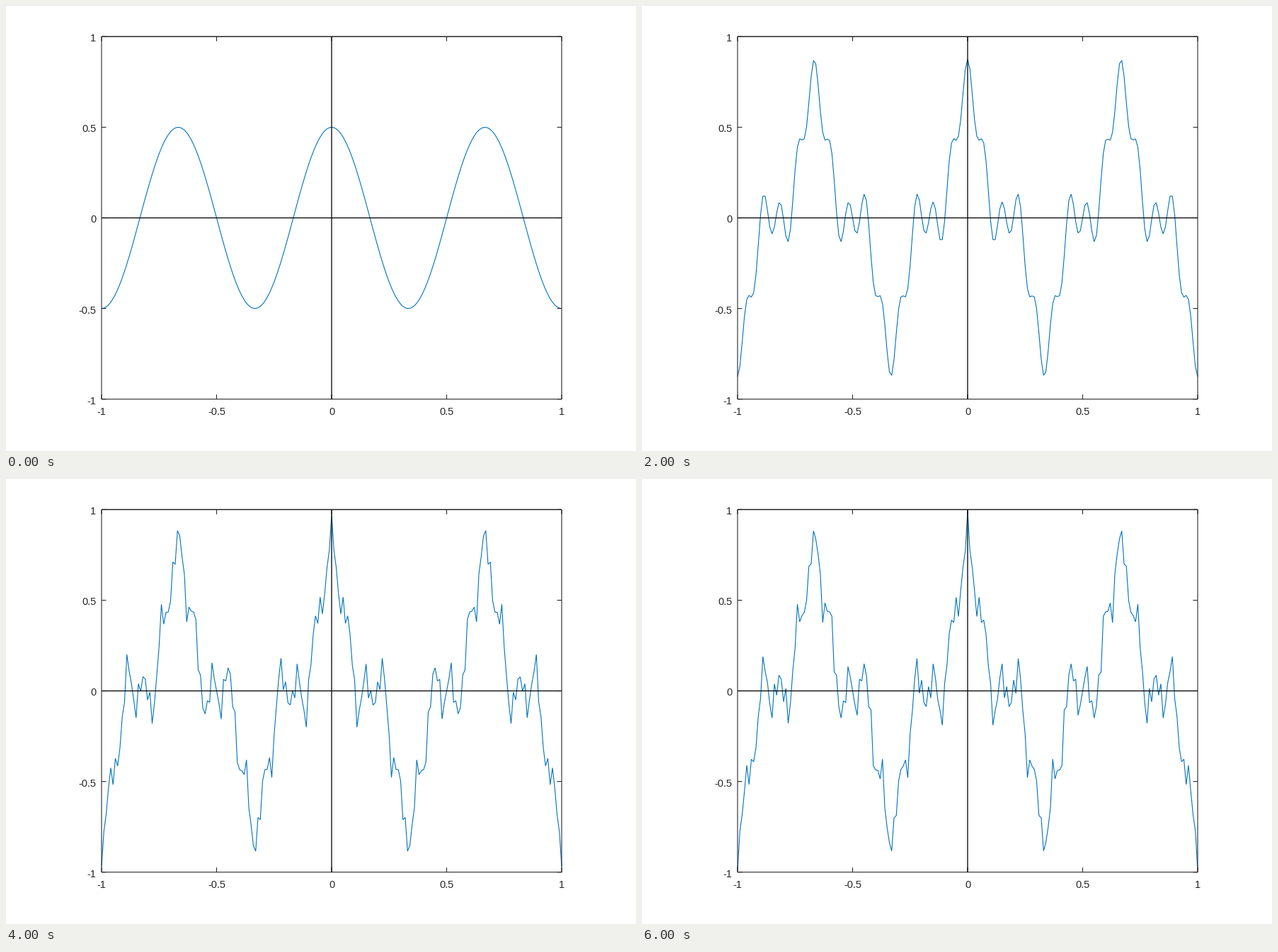
Animation of 890x629 px, one loop 7 s. Source, as a matplotlib script:

```python
import numpy as np
import matplotlib.pyplot as plt
from matplotlib.animation import FuncAnimation

W, H, DPI = 890, 629, 64
PX = 72 / DPI                      # points per pixel
CX, CY = 460, 299.5                # plot centre in pixels
RX, RY = 325, 256.2                # pixels per data unit
TICK = 6.5
INK = "#262626"
TERMS = 7

plt.rcParams["font.family"] = "Liberation Sans"
plt.rcParams["path.simplify"] = False

fig = plt.figure(figsize=(W / DPI, H / DPI), dpi=DPI, facecolor="white")
ax = fig.add_axes([0, 0, 1, 1])
ax.set(xlim=(0, W), ylim=(H, 0))
ax.axis("off")


def to_px(x, y):
    return CX + RX * x, CY - RY * y


def stroke(xs, ys, color, width, z):
    return ax.plot(xs, ys, color=color, lw=width * PX, zorder=z, snap=False,
                   solid_capstyle="butt", solid_joinstyle="miter")[0]


def label(x, y, value, align):
    ax.text(x, y, f"{value:g}", color=INK, fontsize=14.56 * PX,
            ha=align, va="baseline")


left, top = to_px(-1, 1)
right, bottom = to_px(1, -1)

stroke([left, right, right, left, left, right],
       [top, top, bottom, bottom, top, top], INK, 1.1, 3)

for v in (-1, -0.5, 0, 0.5, 1):
    x, y = to_px(v, v)
    for edge, step in ((top, TICK), (bottom, -TICK)):
        stroke([x, x], [edge, edge + step], INK, 1.1, 3)
    for edge, step in ((left, TICK), (right, -TICK)):
        stroke([edge, edge + step], [y, y], INK, 1.1, 3)
    label(x, 577.5, v, "center")
    label(127.5, y + 7, v, "right")

stroke([left, right], [CY, CY], "black", 1.3, 4)
stroke([CX, CX], [top, bottom], "black", 1.3, 4)

xs = np.linspace(-1, 1, 201)
curve = stroke([], [], "#0072BD", 1.1, 2)


def partial_sum(count):
    """Weierstrass series with a = 1/2, b = 3, starting at n = 1."""
    return sum(0.5**n * np.cos(3**n * np.pi * xs) for n in range(1, count + 1))


def update(i):
    curve.set_data(*to_px(xs, partial_sum(i + 1)))
    return [curve]


anim = FuncAnimation(fig, update, frames=TERMS, interval=1000,
                     repeat=True, repeat_delay=0, blit=False)
plt.show()
```
